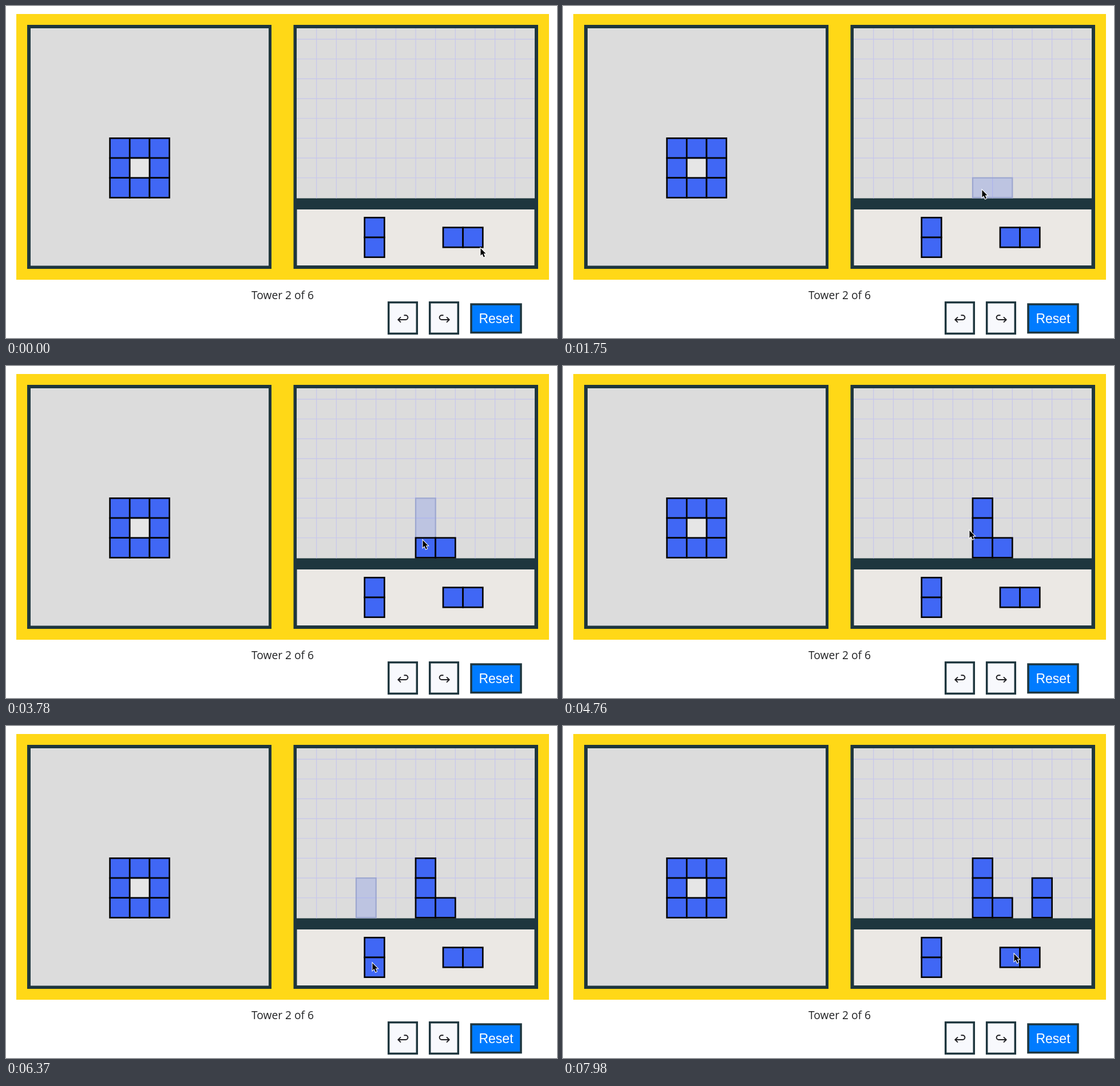
Write an HTML page that moves like this. It is 963 px wide and 581 px high and loops after 8000 ms.

```html
<!DOCTYPE html>
<html lang="en">
<head>
<meta charset="utf-8">
<title>Tower puzzle</title>
<style>
html, body { margin: 0; width: 100%; height: 100%; overflow: hidden; background: #fff; }
svg { display: block; width: 963px; height: 581px; }
.cell { fill: #4067f5; stroke: #050508; stroke-width: 2.7; }
.ghost { fill: #4067f5; fill-opacity: .2; stroke: #9da7d0; stroke-width: 2.2; }
.grid { stroke: #c6c6ec; stroke-width: 1.2; }
.frame { fill: #1e363e; }
.panel { fill: #dcdcdc; }
.button { fill: #f8f9fd; stroke: #1e363e; stroke-width: 3.5; }
.icon { fill: none; stroke: #1c1c20; stroke-width: 1.9; }
.label { font: 19.2px "Open Sans", "Noto Sans", sans-serif; fill: #212224; text-anchor: middle; }
.reset { font: 23px "Liberation Sans", Arial, sans-serif; fill: #fff; text-anchor: middle; }
</style>
</head>
<body>
<svg viewBox="0 0 963 581">
  <rect x="18" y="14" width="931" height="465" fill="#ffd817"/>
  <rect class="frame" x="37" y="33" width="427" height="427"/>
  <rect class="panel" x="43" y="39" width="416" height="415.5"/>
  <rect class="frame" x="502.5" y="33" width="427.5" height="427"/>
  <rect class="panel" x="508" y="39" width="416" height="297.5"/>
  <rect x="508.5" y="356" width="415" height="98" fill="#ebe8e4"/>
  <g id="grid" class="grid"></g>
  <g id="fixed"></g>
  <text class="label" x="483.5" y="513">Tower 2 of 6</text>
  <rect class="button" x="668.7" y="518.7" width="49.6" height="54.6"/>
  <rect class="button" x="740.7" y="518.7" width="49.6" height="54.6"/>
  <rect class="button" x="813" y="522" width="87" height="49.5" style="fill:#007bff"/>
  <path id="undo" class="icon" d="M685.5 549H698.5A3.9 3.9 0 0 0 698.5 541.2H695.5M690 544.3L685.3 549L690 553.7"/>
  <use href="#undo" transform="matrix(-1 0 0 1 1460 0)"/>
  <text class="reset" x="856.5" y="554.5">Reset</text>
  <g id="play"></g>
  <path id="cursor" d="M0 0V12.8L2.9 10.1L5.3 15.6L7.5 14.6L5.2 9.3H9Z"
        fill="#000" stroke="#fff" stroke-width="2" paint-order="stroke"/>
</svg>
<script>
const LOOP = 8000, TICK = 70;
const CELL = 416 / 12, LEFT = 508, FLOOR = 335.4, TOP = 39;
const $ = id => document.getElementById(id);

const rect = (cls, x, y, w, h) =>
  `<rect class="${cls}" x="${x}" y="${y}" width="${w}" height="${h}"/>`;

function piece(x, y, cols, rows) {
  let out = "";
  for (let r = 0; r < rows; r++)
    for (let c = 0; c < cols; c++)
      out += rect("cell", x + c * CELL, y + r * CELL, CELL, CELL);
  return out;
}

// Pointer moves: first tick, last tick, x, y reached.
const moves = [
  [1, 1, 823, 419], [5, 7, 793, 398], [10, 12, 762, 368], [13, 14, 750, 383],
  [15, 16, 760, 397], [18, 18, 768, 380], [20, 25, 732, 321], [27, 31, 669, 373],
  [32, 33, 646, 403], [34, 36, 658, 379], [38, 38, 623, 408], [40, 40, 644, 400],
  [41, 41, 648, 402], [47, 50, 711, 319], [53, 56, 745, 289], [65, 68, 710, 287],
  [69, 72, 615, 412], [73, 74, 648, 423], [76, 77, 640, 418], [82, 83, 637, 416],
  [91, 91, 640, 414], [92, 94, 743, 372], [102, 102, 775, 354], [103, 105, 848, 336],
  [106, 107, 823, 328], [109, 109, 854, 302], [111, 111, 847, 321], [113, 114, 788, 398]
];

// Each drag shows a preview from pick-up until the drop.
const drags = [
  { from: 18, drop: 26, cols: 2, rows: 1 },
  { from: 41, drop: 64, cols: 1, rows: 2 },
  { from: 77, drop: 111, cols: 1, rows: 2 }
];

function pointer(tick) {
  let x = 829, y = 423;
  for (const [first, last, toX, toY] of moves) {
    if (tick < first) break;
    const k = Math.min(1, (tick - first + 1) / (last - first + 1));
    x += (toX - x) * k;
    y += (toY - y) * k;
  }
  return [x, y];
}

function drawPieces(tick) {
  const heights = Array(12).fill(0);
  let ghost = "", placed = "";
  for (const { from, drop, cols, rows } of drags) {
    if (tick < from) break;
    const col = Math.floor((pointer(Math.min(tick, drop - 1))[0] - LEFT) / CELL);
    const base = Math.max(...heights.slice(col, col + cols));
    const x = LEFT + col * CELL, y = FLOOR - (base + rows) * CELL;
    if (tick < drop) {
      ghost = rect("ghost", x, y, cols * CELL, rows * CELL);
    } else {
      placed += piece(x, y, cols, rows);
      heights.fill(base + rows, col, col + cols);
    }
  }
  return ghost + placed;
}

function buildFixed() {
  let lines = "";
  for (let i = 1; i < 12; i++) {
    const x = LEFT + i * CELL;
    lines += `<path d="M${x} ${TOP}V336.5"/>`;
  }
  for (let i = 1; i < 9; i++) {
    const y = FLOOR - i * CELL;
    lines += `<path d="M${LEFT} ${y}H924"/>`;
  }
  $("grid").innerHTML = lines;

  const x = 181.6, y = FLOOR - 3 * CELL;
  $("fixed").innerHTML =
    piece(x, y, 3, 3) +
    `<rect class="cell" x="${x + CELL}" y="${y + CELL}" width="${CELL}" height="${CELL}" style="fill:#e6e6e6"/>` +
    piece(626.7, 370.3, 1, 2) + piece(764, 387.6, 2, 1);
}

let shown = -1;
function render(now) {
  const tick = Math.floor((now % LOOP) / TICK);
  if (tick !== shown) {
    shown = tick;
    const [x, y] = pointer(tick);
    $("play").innerHTML = drawPieces(tick);
    $("cursor").setAttribute("transform", `translate(${x + .5} ${y + 1})`);
  }
}

buildFixed();
const start = performance.now();
function loop() {
  render(performance.now() - start);
  requestAnimationFrame(loop);
}
loop();
</script>
</body>
</html>
```
